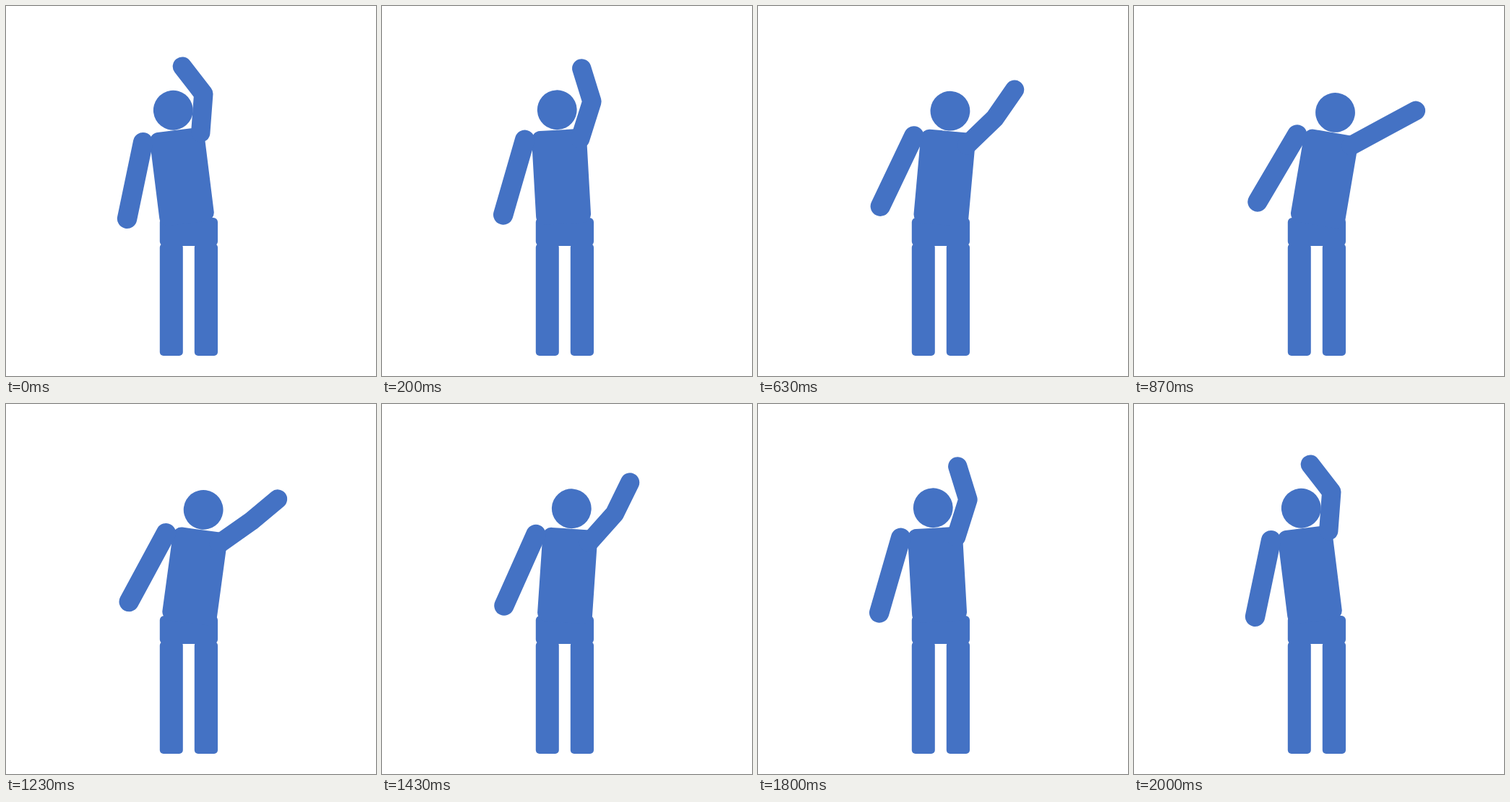
Recreate the animation shown at these times as an HTML page. Size 512 by 512 pixels, loop 2030 ms.

```html
<!DOCTYPE html>
<html>
<head>
<meta charset="utf-8">
<style>
html, body { margin: 0; width: 100%; height: 100%; overflow: hidden; background: #fff; }
svg { display: block; width: 100vw; height: 100vh; fill: #4472c4; }
polyline { fill: none; stroke: #4472c4; stroke-linecap: round; stroke-linejoin: round; }
</style>
</head>
<body>
<svg viewBox="0 0 512 512">
  <rect x="212.8" y="329" width="32" height="155" rx="5"/>
  <rect x="260.8" y="329" width="32.2" height="155" rx="5"/>
  <rect x="212.8" y="293" width="80.2" height="39" rx="6"/>
  <g id="trunk">
    <rect x="214" y="171.8" width="76" height="130.2" rx="12"/>
    <circle cx="251.4" cy="143.9" r="27.4"/>
  </g>
  <polyline id="rest" stroke-width="27.5"/>
  <polyline id="wave" stroke-width="26.4"/>
</svg>
<script>
const LOOP = 2030, HALF = 30, PIVOT = [244, 306];
const trunk = document.getElementById('trunk');
const rest = document.getElementById('rest');
const wave = document.getElementById('wave');

// Forearm angle keys: [step, degrees from upright]
const FOREARM = [[0, -37.8], [11, 0], [19, 34.8], [26, 61.6], [30, 74.5]];

function between(keys, n) {
  const i = Math.max(1, keys.findIndex(k => k[0] >= n));
  const [a, u] = keys[i - 1], [b, v] = keys[i];
  return u + (v - u) * (n - a) / (b - a);
}

// Point at a distance from [x, y], angle clockwise from upright
function reach([x, y], length, deg) {
  const r = deg * Math.PI / 180;
  return [x + length * Math.sin(r), y - length * Math.cos(r)];
}

function draw(n) {
  const tilt = -7.1 + 0.645 * n;
  trunk.setAttribute('transform', `rotate(${tilt} ${PIVOT})`);

  const shoulder = reach(PIVOT, 129.2, tilt - 17.8);
  rest.setAttribute('points', [shoulder, reach(shoulder, 107.7, 191.8 + 0.72 * n)].join(' '));

  const elbow = [273.3 + 2.86 * n, 121.6 + 1.77 * n];
  wave.setAttribute('points', [
    reach(elbow, 54, 184.3 + 2.2 * n),
    elbow,
    reach(elbow, 48, between(FOREARM, n))
  ].join(' '));
}

// 30 steps a second, each starting on a whole hundredth
function tick() {
  const t = Math.floor(performance.now() % LOOP / 10) * 10;
  const step = Math.floor((t + 4) * 0.03);
  draw(HALF - Math.abs(HALF - step));
  requestAnimationFrame(tick);
}
tick();
</script>
</body>
</html>
```
